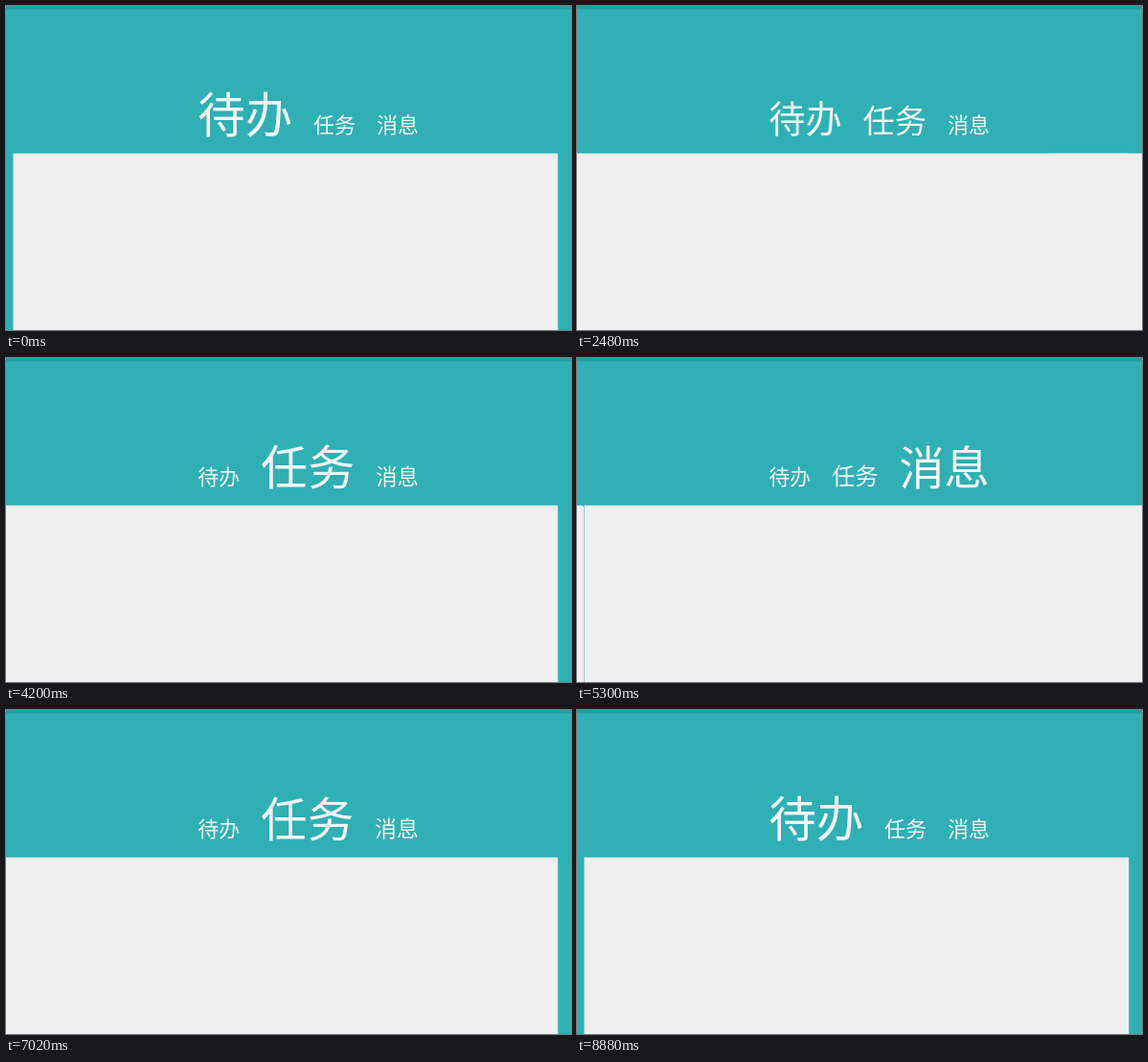
Recreate the animation shown at these times as an HTML page with a canvas. Size 590 by 338 pixels, loop 9080 ms.

```html
<!DOCTYPE html>
<html lang="zh">
<head>
<meta charset="utf-8">
<style>
  html, body { margin: 0; width: 590px; height: 338px; overflow: hidden; background: #30b0b4; }
  canvas { display: block; }
</style>
</head>
<body>
<canvas id="stage" width="590" height="338"></canvas>
<script>
const W = 590, H = 338, LOOP = 9080, STEP = 100;
const TOP = 153.7, LEFT = 7.5, RIGHT = 576.3;
const SMALL = 22, LARGE = 49.5, GAP = 21.8;
const STRETCH = 1164, SLIDE = 265;
const tabs = ['待办', '任务', '消息'];
const ctx = document.getElementById('stage').getContext('2d');

const swipes = [
  { start: 1360, end: 3680, from: 0, to: 1 },
  { start: 4080, end: 5520, from: 1, to: 2 },
  { start: 6000, end: 7130, from: 2, to: 1 },
  { start: 7660, end: 8840, from: 1, to: 0 }
];

const clamp = v => Math.max(0, Math.min(1, v));
const ease = t => 1 - (1 - t * t) ** 2;

// The picture advances in steps, the first one 20 ms into the swipe.
function pagePosition(time) {
  const swipe = swipes.findLast(s => time >= s.start + 20);
  if (!swipe) return 0;
  const { start, end, from, to } = swipe;
  const elapsed = 20 + Math.floor((time - start - 20) / STEP) * STEP;
  return from + (to - from) * ease(clamp(elapsed / (end - start)));
}

function card(left, right, leftRadius, rightRadius) {
  ctx.beginPath();
  ctx.roundRect(left, TOP, right - left, H, [leftRadius, rightRadius, 0, 0]);
  ctx.fill();
}

// The near page keeps its inner edge and stretches outwards; the far one slides in.
function drawCards(pos) {
  const f = pos - Math.floor(pos);
  ctx.fillStyle = '#efefef';
  if (f === 0) return card(LEFT, RIGHT, 0, 0);
  const far = f > 0.5;
  card(LEFT - STRETCH * f, far ? SLIDE * (1 - f) - 14 : RIGHT, 3, far ? 3 : 0);
  card(far ? LEFT : 599 - SLIDE * f, RIGHT + STRETCH * (1 - f), far ? 0 : 3, 3);
}

function drawTabs(pos) {
  ctx.fillStyle = '#f2f6f6';
  let x = 200.3;
  tabs.forEach((label, i) => {
    const size = SMALL + (LARGE - SMALL) * clamp(1 - Math.abs(pos - i));
    ctx.font = `${size}px "Noto Sans CJK SC", "Noto Sans CJK", sans-serif`;
    ctx.fillText(label, x, 132.3);
    x += 2 * size + GAP;
  });
}

function draw(time) {
  const pos = pagePosition(time);
  ctx.fillStyle = '#30b0b4';
  ctx.fillRect(0, 0, W, H);
  ctx.fillStyle = '#1f9fa8';
  ctx.fillRect(0, 0, W, 3);
  ctx.fillStyle = '#29a8ad';
  ctx.fillRect(0, 3, W, 1);
  drawCards(pos);
  drawTabs(pos);
}

const begin = performance.now();
function tick() {
  draw((performance.now() - begin) % LOOP);
  requestAnimationFrame(tick);
}
tick();
</script>
</body>
</html>
```
